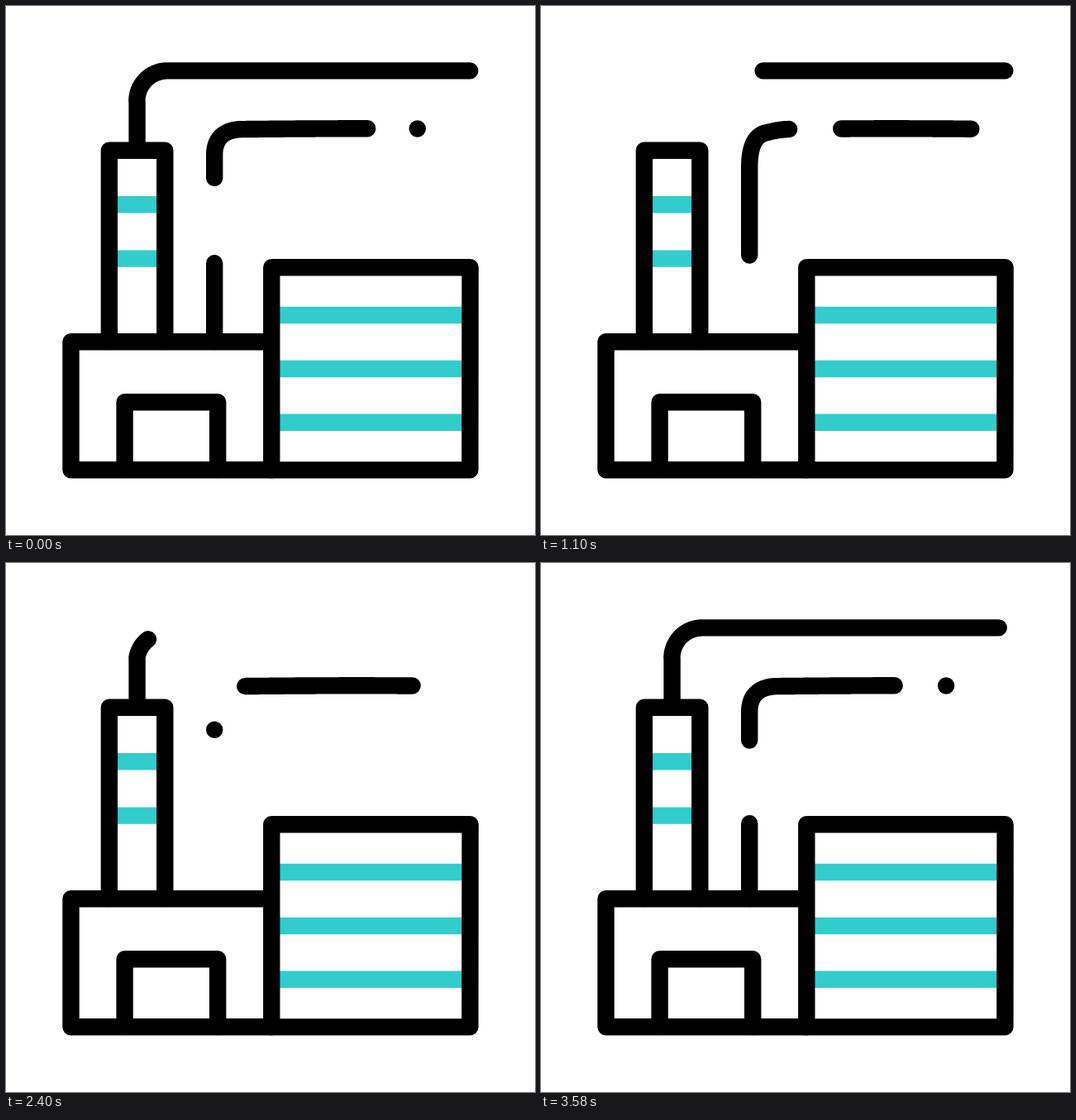
Animation, 640 px wide and 640 px high, one loop 3600 ms. Source, as an HTML page:

```html
<!DOCTYPE html>
<html lang="en">
<head>
<meta charset="utf-8">
<title>Factory</title>
<style>
  html, body { margin: 0; width: 100%; height: 100%; overflow: hidden; background: #fff; }
  svg { display: block; width: 100vw; height: 100vh; }
  path { fill: none; stroke: #000; stroke-width: 20.4; stroke-linecap: round; stroke-linejoin: round; }
  .stripe { stroke: #3cc; stroke-linecap: butt; }
</style>
</head>
<body>
<svg viewBox="0 0 640 640">
  <path class="stripe" d="M130 240.2H188M130 305.6H188M326 374H556M326 439H556M326 503.8H556"/>
  <g id="smoke"></g>
  <path d="M124.9 406V174.7H192.3V406"/>
  <path d="M321 406.2H78.5V561.2H321"/>
  <path d="M143.6 561V479.3H256.2V561"/>
  <path d="M321.3 316.3H561.6L561.4 561.4H321.3Z"/>
</svg>
<script>
const LOOP = 3600;
const smoke = document.getElementById('smoke');
const clamp = v => Math.min(1, Math.max(0, v));
const mix = (a, b, f) => a + (b - a) * f;

const steady = f => f;
const surge = f => f ** 1.4;
const settle = f => 1 - (1 - f) ** 1.4;

function newPath() {
  const el = document.createElementNS('http://www.w3.org/2000/svg', 'path');
  smoke.append(el);
  return el;
}

// Place on a route whose stops are reached at the given times.
function travel(stops, times, t, ease, firstEase = ease) {
  let i = 0;
  while (i < times.length - 2 && t > times[i + 1]) i++;
  const f = clamp((t - times[i]) / (times[i + 1] - times[i]));
  return mix(stops[i], stops[i + 1], (i ? ease : firstEase)(f));
}

function trace(point, from, to) {
  const n = to - from < 0.001 ? 1 : 150;
  let d = '';
  for (let i = 0; i <= n; i++) {
    const [x, y] = point(mix(from, to, i / n));
    d += (i ? 'L' : 'M') + x.toFixed(2) + ' ' + y.toFixed(2);
  }
  return d;
}

// Upper plume: 0-1 riser, 1-2 bend, 2-3 level run.
const SECTIONS = [0, 1, 2, 3];
const wipe = [0, 400, 900, 1900];
const grow = [1900, 2130, 2677, 3600];

function plumePoint(p, tip) {
  if (p < 1) return [158.6, mix(174, 115, p)];
  if (p > 2) return [mix(195, 561.3, p - 2), 78.4];
  const q = p - 1, f = tip - 1;
  const dent = f > 0 && f < 1 ? 4.3 * Math.sin(Math.PI * f) * q / f : 0;
  const r = 36.6 - dent, a = q * Math.PI / 2;
  return [195 - r * Math.cos(a), 115 - r * Math.sin(a)];
}

// Lower plume, by distance u; k softens the bend.
const BEND = 226, RUN = 276, END = 550;

function puffPoint(u, k) {
  const start = BEND - 16 * k;
  if (u < start) return [252.2, 406 - u];
  if (u > RUN) {
    const v = u - RUN, near = k * clamp(1 - v / 17);
    return [287 + v - 13 * near, 149.1 + 4 * near * near - 0.8 * Math.sin(Math.PI * v / 274)];
  }
  const t = (u - start) / (RUN - start), s = 1 - t;
  const bez = (a, b, c, d) => s * s * s * a + 3 * s * s * t * b + 3 * s * t * t * c + t * t * t * d;
  return [
    bez(252.2, 252.2, 264 - 4 * k, 287 - 13 * k),
    bez(180 + 16 * k, 160 + 8 * k, 149 + 6 * k, 149.1 + 4 * k)
  ];
}

const tailAt = (times, t) => travel([0, BEND, RUN, END], times, t, surge);
const headAt = (times, t) => travel([0, BEND, RUN, 436, END], times, t, surge, settle);

const puffs = [
  { head: [-440, 930, 985, 1621, 3145], tail: [270, 1712, 2376, 3160] },
  { head: [2600, 3140, 3165, 3621, 5100], tail: [2762, 3684, 4335, 5248] },
  { tail: [1255, 2487, 2839, 3758] }
];

const plume = newPath();
for (const p of puffs) p.el = newPath();

function puffShape({ head, tail }, t) {
  const first = (head || tail)[0];
  const local = first + (t - first + LOOP) % LOOP;
  if (local > tail[3]) return '';
  const from = tailAt(tail, local);
  const to = head ? Math.max(from, headAt(head, local)) : from;
  const k = clamp(1 - Math.abs(to - 293) / 60);
  return trace(u => puffPoint(u, k), from, to);
}

function draw(t) {
  const growing = t >= grow[0];
  const from = growing ? 0 : travel(SECTIONS, wipe, t, steady);
  const tip = growing ? travel(SECTIONS, grow, t, steady) : 3;
  plume.setAttribute('d', trace(p => plumePoint(p, tip), from, tip));
  for (const p of puffs) p.el.setAttribute('d', puffShape(p, t));
}

const begin = performance.now();
function tick() {
  draw((performance.now() - begin) % LOOP);
  requestAnimationFrame(tick);
}
tick();
</script>
</body>
</html>
```
